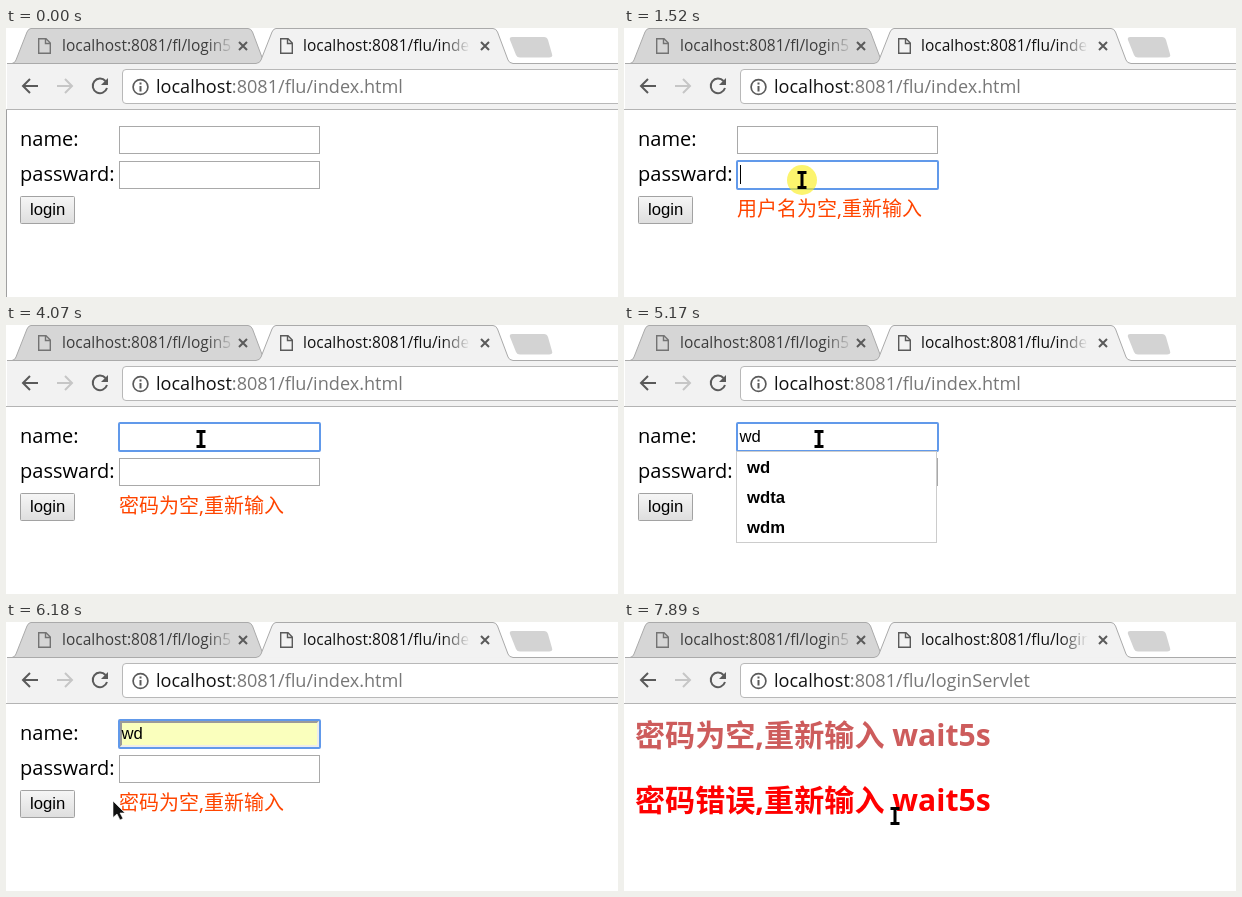
Recreate the animation shown at these times as an HTML page. Size 612x269 px, loop 8000 ms.

```html
<!DOCTYPE html>
<html lang="zh-CN">
<head>
<meta charset="utf-8">
<style>
  html, body { margin: 0; height: 100%; overflow: hidden; background: #fff; }
  svg { display: block; width: 612px; height: 269px; font-family: "Open Sans", "Noto Sans CJK SC", "Noto Sans CJK", sans-serif; }
  text { white-space: pre; }
  .line { fill: none; stroke: #5a5a5a; stroke-width: 2; }
  .thin { stroke-width: 1.4; }
  .tab { font-size: 15.5px; }
  .url { font-size: 18.1px; }
  .label { font-size: 20px; }
  .form { font: 16.67px "Liberation Sans", Arial, sans-serif; }
  .bold { font-weight: bold; }
  .heading { font-size: 30.1px; font-weight: bold; }
  .field { fill: #fff; stroke: #a9a9a9; }
  .focus { fill: none; stroke: #6199ea; stroke-width: 2; }
</style>
</head>
<body>
<svg viewBox="0 0 612 269">
  <defs>
    <linearGradient id="fadeBack" gradientUnits="userSpaceOnUse" x1="200" x2="229" y1="0" y2="0">
      <stop stop-color="#3c3c3c"/><stop offset="1" stop-color="#3c3c3c" stop-opacity="0"/>
    </linearGradient>
    <linearGradient id="fadeFront" gradientUnits="userSpaceOnUse" x1="436" x2="464" y1="0" y2="0">
      <stop stop-color="#111"/><stop offset="1" stop-color="#111" stop-opacity="0"/>
    </linearGradient>
    <linearGradient id="face" x2="0" y2="1">
      <stop stop-color="#f6f6f6"/><stop offset="1" stop-color="#dedede"/>
    </linearGradient>
    <path id="doc" class="line thin" d="M.7.7H8L12.3 5V15.3H.7ZM7.5 1V5.5H12"/>
    <path id="cross" class="line" d="M-4-4 4 4M4-4-4 4"/>
  </defs>

  <!-- tabs -->
  <path d="M6 35.500Q9 35 10 32L21 4Q22.500.5 25 .5H242Q245 .5 246.500 4L257 32Q258 35 261 35.500Z" fill="#d6d6d6" stroke="#aaa"/>
  <path d="M506 9H538Q541 9 542 12L546 26Q547 29.500 543 29.500H514Q511 29.500 510 27L504 12Q503 9 506 9Z" fill="#d3d3d3"/>
  <path d="M1 35H612V81H1Z" fill="#f2f2f2"/>
  <path d="M1 35.500H250Q254 35 255 32L266 4Q267.500.5 270 .5H487Q490 .5 491.500 4L502 32Q503 35 507 35.500H612" fill="#f2f2f2" stroke="#aaa"/>
  <path d="M0 81.500H612" stroke="#b4b4b4"/>
  <path id="edge" d="M.5 82V269" stroke="#a0a0a0"/>
  <use href="#doc" x="32" y="10" opacity=".8"/>
  <use href="#doc" id="pageIcon" x="274" y="10"/>
  <path id="spinner" class="line" d="M275 13.500A8 8 0 0 1 281 10.500" style="stroke:#a4a4a4"/>
  <use href="#cross" x="237" y="18"/>
  <use href="#cross" x="479" y="18"/>
  <text class="tab" x="56" y="23" fill="url(#fadeBack)">localhost:8081/fl/login5</text>
  <text class="tab" id="title" x="297" y="23" fill="url(#fadeFront)"></text>

  <!-- toolbar -->
  <path class="line" d="M32 58H17M24 51 17 58 24 65"/>
  <path class="line" d="M51 58H66M59 51 66 58 59 65" style="stroke:#c6c6c6"/>
  <g id="reload"><path class="line" d="M99.500 53A7.300 7.300 0 1 0 101 60"/><path d="M102 50V57H95Z" fill="#5a5a5a"/></g>
  <path id="stop" class="line" d="M87 51 101 65M101 51 87 65"/>
  <path d="M620 41.500H120Q116.500 41.500 116.500 45V72Q116.500 75.500 120 75.500H620" fill="#fff" stroke="#b8b8b8"/>
  <g class="line"><circle cx="134.500" cy="59" r="7.400" stroke-width="1.700"/><path d="M134.500 54.500V56.500M134.500 58V63.500"/></g>
  <text class="url" x="150" y="65" fill="#777"><tspan fill="#111">localhost</tspan><tspan id="path"></tspan></text>

  <!-- login form -->
  <g id="form">
    <text class="label" x="14" y="118">name:</text>
    <text class="label" x="14" y="153">passward:</text>
    <rect class="field" x="113.500" y="98.500" width="200" height="27"/>
    <rect class="field" x="113.500" y="133.500" width="200" height="27"/>
    <g id="filled">
      <path d="M113 98H314V126H113Z" fill="#faffbd"/>
      <path d="M113 126V98H314L311 101H116V123Z" fill="#9a9a9a"/>
      <path d="M113 126H314V98L311 101V123H116Z" fill="#ececec"/>
    </g>
    <rect id="nameFocus" class="focus" x="113" y="98" width="201" height="28" rx="1"/>
    <rect id="passFocus" class="focus" x="113" y="133" width="201" height="28" rx="1"/>
    <text id="typed" class="form" x="115.500" y="117"></text>
    <rect id="caret" width="1" height="19"/>
    <rect x="14.500" y="168.500" width="54" height="27" rx="1" fill="url(#face)" stroke="#a2a2a2"/>
    <text id="login" class="form" x="24" y="187">login</text>
    <text id="message" class="label" x="113" y="188" fill="#ff4500"></text>
    <g id="list" class="form bold">
      <rect x="112.500" y="126.500" width="200" height="91" fill="#fff" stroke="#ccc"/>
      <rect id="hover" x="113" y="126" width="199" height="30" fill="#cbe5fe"/>
      <text x="123" y="148">wd</text>
      <text x="123" y="178">wdta</text>
      <text x="123" y="208">wdm</text>
    </g>
  </g>

  <!-- reply page -->
  <g id="reply" class="heading">
    <text x="11" y="124" fill="#cd5c5c">密码为空,重新输入 wait5s</text>
    <text x="11" y="189" fill="#f00">密码错误,重新输入 wait5s</text>
  </g>

  <g id="pointer">
    <circle id="halo" r="15" fill="#fbee20" opacity=".65"/>
    <path id="beam" fill="none" stroke="#000" stroke-width="3" d="M-4.500-7.500H4.500M0-8V8M-4.500 7.500H4.500"/>
    <path id="arrow" fill="#111" stroke="#fff" stroke-width=".6" d="M0 0V16.500L4 13 7 19 10 17.500 7 12H12Z"/>
  </g>
</svg>

<script>
const LOOP = 8000;
const el = {};
document.querySelectorAll('[id]').forEach(node => el[node.id] = node);

// Pointer moves: start, end, number of steps, target x, target y
const MOVES = [
  [210, 600, 6, 183, 115],
  [905, 1060, 3, 178, 152],
  [1910, 2300, 6, 162, 116],
  [2760, 2915, 3, 165, 162],
  [2990, 3140, 3, 181, 122],
  [3370, 3460, 2, 181, 117],
  [3920, 4070, 3, 195, 114],
  [5400, 5712, 5, 180, 142],
  [5870, 6180, 5, 107, 179],
  [6260, 6340, 2, 40, 181],
  [6650, 6650, 1, 74, 193],
  [6730, 6800, 2, 166, 205],
  [7660, 7890, 4, 271, 194],
];
const CLICKS = [[750, 905], [1520, 1590], [2450, 2680], [5790, 5870], [6490, 6645]];
const CARET = [[750, 1290], [1520, 2050], [2530, 3080], [3610, 4070], [4540, 5170], [5700, 6180]];

const within = (t, a, b) => t >= a && t < b;
const during = (t, spans) => spans.some(([a, b]) => within(t, a, b));
const show = (node, on) => node.style.display = on ? '' : 'none';
const write = (node, text) => { if (node.textContent !== text) node.textContent = text; };

function pointerAt(t) {
  let x = 530, y = 240;
  for (const [start, end, steps, tx, ty] of MOVES) {
    if (t < start) break;
    const k = t >= end ? 1 : (Math.floor((t - start) / (end - start) * (steps - 1)) + 1) / steps;
    x += (tx - x) * k;
    y += (ty - y) * k;
  }
  return [x, y];
}

function draw(t) {
  const listOpen = within(t, 4540, 5870), loading = within(t, 6570, 6730);
  const sent = t >= 6570, loaded = t >= 6730;
  const inPassword = within(t, 1520, 2530);

  show(el.edge, t < 750);
  show(el.pageIcon, !loading);
  show(el.spinner, loading);
  el.spinner.setAttribute('transform', `rotate(${(6650 - t) * 0.3} 281 18)`);
  show(el.reload, !loading);
  show(el.stop, loading);
  write(el.title, 'localhost:8081/flu/' + (sent ? 'login' : 'index'));
  write(el.path, ':8081/flu/' + (sent ? 'loginServlet' : 'index.html'));

  show(el.form, !loaded);
  show(el.reply, loaded);
  show(el.nameFocus, within(t, 750, 1520) || within(t, 2530, 6490));
  show(el.passFocus, inPassword);
  show(el.filled, t >= 5630);
  show(el.list, listOpen);
  show(el.hover, t >= 5630);
  write(el.typed, t < 4540 ? '' : t < 4620 ? 'w' : 'wd');
  const empty = inPassword || t >= 6490 ? '用户名' : '密码';
  write(el.message, t < 1520 ? '' : empty + '为空,重新输入');
  el.login.style.fill = t < 6340 ? '#000' : '#444';

  show(el.caret, during(t, CARET));
  el.caret.setAttribute('x', t < 4540 ? 116 : t < 4620 ? 128 : 137);
  el.caret.setAttribute('y', inPassword ? 137 : 102);

  const [x, y] = pointerAt(t);
  const overField = x > 113 && x < 314 && y > 98 && y < (listOpen ? 126 : 161);
  const overText = x > 70 && x < 370 && y > 184 && y < 204 && t > 6600;
  show(el.pointer, t >= 210);
  el.pointer.setAttribute('transform', `translate(${x} ${y})`);
  show(el.halo, during(t, CLICKS));
  show(el.beam, overField || overText);
  show(el.arrow, !overField && !overText);
}

const begin = performance.now();
function tick() {
  draw((performance.now() - begin) % LOOP);
  requestAnimationFrame(tick);
}
tick();
</script>
</body>
</html>
```
